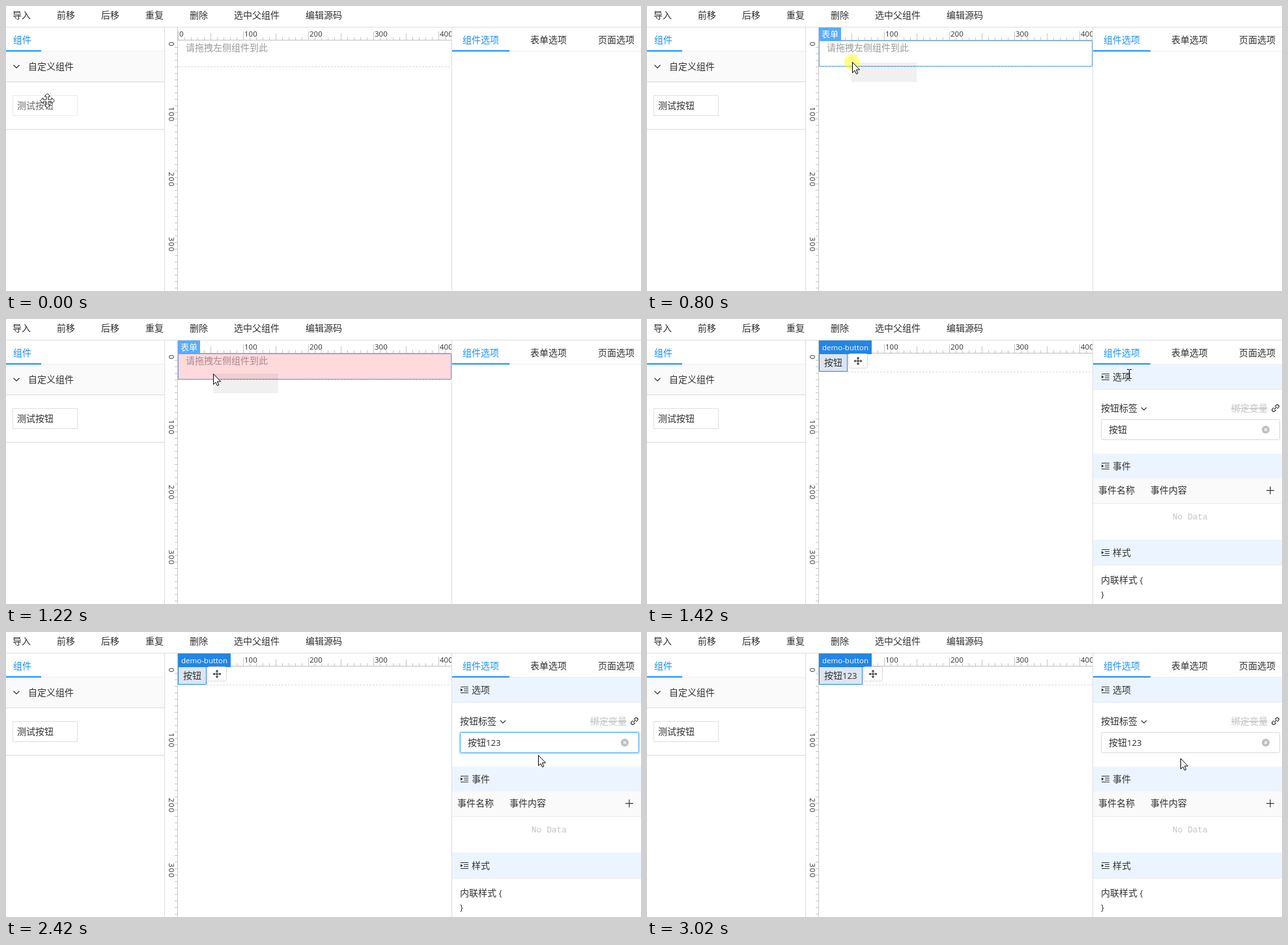
An HTML page with a canvas that plays this animation: 975 px wide and 438 px high, repeating every 5.42 s.

```html
<!DOCTYPE html>
<html lang="zh-CN">
<head>
<meta charset="utf-8">
<title>组件拖拽演示</title>
<style>
html, body { margin: 0; width: 100%; height: 100%; overflow: hidden; background: #fff; }
canvas { display: block; }
</style>
</head>
<body>
<canvas id="stage" width="975" height="438"></canvas>
<script>
const ctx = document.getElementById('stage').getContext('2d');
const LOOP = 5420;
const INK = '#303030', BLUE = '#1890ff', RULE = '#d9d9d9';
const CJK = '"Noto Sans CJK SC", "Noto Sans CJK JP", "Noto Sans CJK", sans-serif';
const LATIN = '"Open Sans", "Noto Sans", sans-serif';

// start time, pointer kind, x, y, pressed, drag ghost position
const POINTER = [
  [0, 'move', 63, 145],
  [200, 'move', 63, 151],
  [400, 'move', 60, 159, true],
  [600, 'arrow', 142, 136, true, [79, 156]],
  [800, 'arrow', 315, 86, true, [314, 87]],
  [1000, 'arrow', 318, 84, true, [318, 84]],
  [1220, 'arrow', 318, 84, false, [318, 84]],
  [1420, 'beam', 740, 84],
  [1620, 'beam', 788, 164, true],
  [1820, 'beam', 796, 171],
  [2020, 'beam', 797, 172],
  [2220, 'beam', 798, 172],
  [2420, 'arrow', 817, 189],
  [2620, 'arrow', 819, 194]
];

function box(x, y, w, h, color) {
  ctx.fillStyle = color;
  ctx.fillRect(x, y, w, h);
}

function frame(x, y, w, h, color, radius = 0) {
  ctx.strokeStyle = color;
  ctx.lineWidth = 1;
  ctx.beginPath();
  ctx.roundRect(x + 0.5, y + 0.5, w - 1, h - 1, radius);
  ctx.stroke();
}

function path(points, color, width = 1) {
  ctx.strokeStyle = color;
  ctx.lineWidth = width;
  ctx.beginPath();
  points.forEach(([x, y]) => ctx.lineTo(x, y));
  ctx.stroke();
}

function polygon(points, fill, stroke) {
  ctx.beginPath();
  points.forEach(([x, y]) => ctx.lineTo(x, y));
  ctx.closePath();
  ctx.fillStyle = fill;
  ctx.fill();
  if (stroke) {
    ctx.strokeStyle = stroke;
    ctx.lineWidth = 1;
    ctx.stroke();
  }
}

function disc(x, y, r, color) {
  ctx.fillStyle = color;
  ctx.beginPath();
  ctx.arc(x, y, r, 0, Math.PI * 2);
  ctx.fill();
}

// Draws mixed text around a vertical centre and returns its right edge.
function text(str, x, mid, color = INK, size = 14) {
  ctx.fillStyle = color;
  for (const run of str.match(/[\u3000-\uffff]+|[^\u3000-\uffff]+/g)) {
    const wide = run.charCodeAt(0) >= 0x3000;
    ctx.font = wide ? `${size}px ${CJK}` : `${size * 0.943}px ${LATIN}`;
    ctx.fillText(run, x, mid + 5);
    x += ctx.measureText(run).width;
  }
  return x;
}

function chevron(x, y, r) {
  path([[x - r, y - r / 2], [x, y + r / 2], [x + r, y - r / 2]], INK, 1.2);
}

function dashes(y, from) {
  ctx.setLineDash([3, 2]);
  path([[from, y + 0.5], [684, y + 0.5]], RULE);
  ctx.setLineDash([]);
}

function toolbar() {
  const items = { 导入: 10, 前移: 78, 后移: 146, 重复: 214, 删除: 282, 选中父组件: 350, 编辑源码: 460 };
  for (const name in items) text(name, items[name], 14);
  box(0, 32, 975, 1, '#dedede');
}

function sidebar(t) {
  const hovered = t < 800;
  box(0, 69, 243, 1, '#efefef');
  text('组件', 11, 52, BLUE);
  box(0, 68, 54, 2, BLUE);
  box(0, 70, 243, 46, '#fafafa');
  box(0, 116, 243, 1, RULE);
  chevron(16, 93, 4.5);
  text('自定义组件', 34, 93);
  frame(10, 137, 100, 32, hovered ? '#e8e8e8' : '#dedede');
  text('测试按钮', 17, 153, hovered ? '#686868' : INK);
  box(0, 189, 243, 1, RULE);
  box(243, 33, 1, 405, '#dcdcdc');
}

function rulers() {
  const tick = '#c4c4c4';
  ctx.save();
  ctx.beginPath();
  ctx.rect(244, 33, 440, 405);
  ctx.clip();
  for (let n = 0; n <= 420; n += 10) {
    const len = n % 100 === 0 ? 13 : n % 50 === 0 ? 10 : 4;
    box(264 + n, 52 - len, 1, len, tick);
    if (n) box(259, 53 + n, 4, 1, tick);
  }
  ctx.font = `11.5px ${LATIN}`;
  ctx.fillStyle = INK;
  for (let n = 0; n <= 400; n += 100) {
    ctx.fillText(n, 266 + n, 47);
    if (n > 300) continue;
    ctx.save();
    ctx.translate(250, 55 + n);
    ctx.rotate(Math.PI / 2);
    ctx.letterSpacing = '1.2px';
    ctx.fillText(n, 0, 0);
    ctx.restore();
  }
  ctx.restore();
  box(264, 52, 420, 1, '#c0c0c0');
  box(263, 33, 1, 405, '#c8c8c8');
}

function moveIcon(x, y) {
  path([[x - 5, y], [x + 5, y]], INK, 1.2);
  path([[x, y - 5], [x, y + 5]], INK, 1.2);
  for (let i = 0; i < 4; i++) {
    ctx.save();
    ctx.translate(x, y);
    ctx.rotate(i * Math.PI / 2);
    polygon([[0, -6.5], [2.3, -3.8], [-2.3, -3.8]], INK);
    ctx.restore();
  }
}

function emptyForm(t) {
  text('请拖拽左侧组件到此', 276, 64, '#999');
  dashes(93, 264);
  if (t < 800) return;
  frame(264, 53, 420, 40, '#5aabfb');
  if (t >= 1000) box(264, 53, 420, 40, 'rgba(255,50,60,.18)');
  box(264, 33, 34, 20, '#5aabfb');
  text('表单', 268, 43, '#fff', 13);
}

function filledForm(t) {
  const renamed = t >= 2820;
  const w = renamed ? 67 : 44;
  dashes(81, 264 + w);
  box(264, 53, w, 28, '#dce5f0');
  frame(264, 53, w, 28, '#2385e4');
  text(renamed ? '按钮123' : '按钮', 272, 67);
  box(264, 33, 81, 21, '#2385e4');
  ctx.font = `11.5px ${LATIN}`;
  ctx.fillStyle = '#fff';
  ctx.fillText('demo-button', 269, 48);
  const x = 265 + w;
  box(x, 54, 30, 22, '#fff');
  frame(x, 53, 30, 23, RULE, 2);
  moveIcon(x + 15, 64.5);
}

function section(name, y, h, mid) {
  box(685, y, 290, h, '#ecf5ff');
  box(685, y + h, 290, 1, '#ebeef2');
  for (const dy of [-5, 4]) box(698, mid + dy, 12, 1, INK);
  for (const dy of [-2, 1]) box(703, mid + dy, 7, 1, INK);
  polygon([[698, mid - 2.5], [701.5, mid], [698, mid + 2.5]], INK);
  text(name, 715, mid);
}

function linkIcon(x, y) {
  ctx.save();
  ctx.translate(x, y);
  ctx.rotate(-Math.PI / 4);
  ctx.strokeStyle = INK;
  ctx.lineWidth = 1.2;
  for (const side of [1, -1]) {
    ctx.beginPath();
    ctx.moveTo(side * 1.2, -2.4);
    ctx.lineTo(side * 4, -2.4);
    ctx.arc(side * 4, 0, 2.4, -Math.PI / 2, Math.PI / 2, side < 0);
    ctx.lineTo(side * 1.2, 2.4);
    ctx.stroke();
  }
  ctx.restore();
  path([[x - 2, y + 2], [x + 2, y - 2]], INK, 1.2);
}

function labelInput(t) {
  const focused = t >= 1620 && t < 2820;
  if (focused) {
    ctx.fillStyle = '#d1e9ff';
    ctx.beginPath();
    ctx.roundRect(695, 152, 279, 36, 4);
    ctx.fill();
  }
  box(698, 155, 273, 30, '#fff');
  const edge = focused ? '#40a9ff' : t >= 2820 && t < 3020 ? '#9bcdf6' : RULE;
  frame(697, 154, 275, 32, edge, 2);
  const typed = t < 1820 ? 0 : Math.min(3, 1 + Math.floor((t - 1820) / 200));
  const end = text('按钮' + '123'.slice(0, typed), 709, 170);
  if (t >= 1620 && t < 2420) box(Math.round(end), 161, 1, 18, '#000');
  disc(950, 170, 6, '#bfbfbf');
  for (const s of [1, -1]) path([[948, 170 - 2 * s], [952, 170 + 2 * s]], '#fff', 1.1);
}

function options(t) {
  section('选项', 70, 38, 89);
  text('按钮标签', 697, 137);
  chevron(763, 138, 4);
  text('绑定变量', 897, 137, '#c4c4c4');
  box(897, 137, 56, 1, '#c4c4c4');
  linkIcon(965, 137);
  labelInput(t);

  section('事件', 207, 38, 226);
  box(685, 245, 290, 38, '#fafafa');
  box(685, 283, 290, 1, '#ececec');
  text('事件名称', 693, 263);
  text('事件内容', 773, 263);
  path([[951, 263.5], [963, 263.5]], INK, 1.2);
  path([[957, 257.5], [957, 269.5]], INK, 1.2);
  ctx.font = '12.86px "Liberation Mono", monospace';
  ctx.fillStyle = '#c4c4c4';
  ctx.fillText('No Data', 807, 308);

  section('样式', 339, 39, 359);
  text('内联样式 {', 697, 401);
  text('}', 697, 423);
}

function inspector(t) {
  box(684, 33, 1, 405, '#dcdcdc');
  box(685, 69, 290, 1, '#efefef');
  text('组件选项', 701, 52, BLUE);
  text('表单选项', 805, 52);
  text('页面选项', 909, 52);
  box(685, 68, 88, 2, BLUE);
  if (t >= 1420) options(t);
}

const cursors = {
  arrow() {
    polygon([[0.5, 0.5], [0.5, 16.5], [4, 13.2], [6.5, 18.5], [8.8, 17.5], [6.4, 12], [11.5, 12]], '#fff', '#000');
  },
  beam() {
    path([[0.5, -6], [0.5, 7]], '#000');
    for (const y of [-6.5, 7.5]) {
      path([[-3, y], [0, y]], '#000');
      path([[1, y], [4, y]], '#000');
    }
  },
  move() {
    const arm = [[-1.5, -1.5], [-1.5, -6.5], [-4.5, -6.5], [0, -11], [4.5, -6.5], [1.5, -6.5]];
    const points = [];
    for (let i = 0; i < 4; i++) {
      const c = Math.round(Math.cos(i * Math.PI / 2));
      const s = Math.round(Math.sin(i * Math.PI / 2));
      arm.forEach(([x, y]) => points.push([x * c - y * s + 0.5, x * s + y * c + 0.5]));
    }
    polygon(points, '#fff', '#222');
  }
};

function pointer(t) {
  const [, kind, x, y, pressed, ghost] = POINTER.findLast(row => t >= row[0]);
  if (ghost) box(ghost[0], ghost[1], 100, 30, 'rgba(0,0,0,.06)');
  if (pressed) disc(x, y, 12, 'rgba(255,255,0,.47)');
  ctx.save();
  ctx.translate(x, y);
  cursors[kind]();
  ctx.restore();
}

function draw(now) {
  const t = now % LOOP;
  box(0, 0, 975, 438, '#fff');
  toolbar();
  sidebar(t);
  rulers();
  if (t < 1420) emptyForm(t);
  else filledForm(t);
  inspector(t);
  pointer(t);
}

const start = performance.now();
function tick() {
  draw(performance.now() - start);
  requestAnimationFrame(tick);
}
tick();
</script>
</body>
</html>
```
